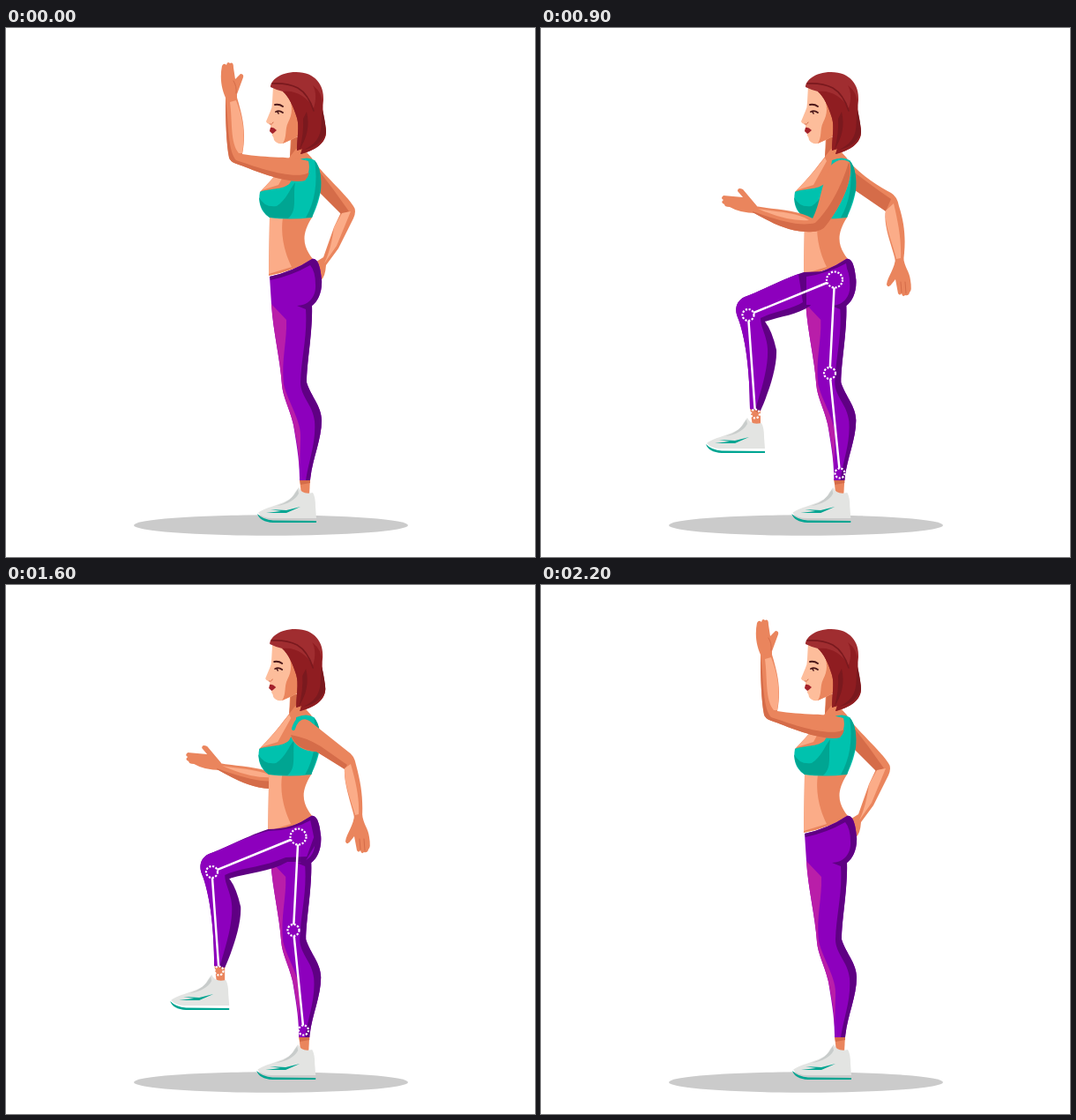
An HTML page that plays this animation: 600x600 px, repeating every 2.4 s.

```html
<!DOCTYPE html>
<html lang="en">
<head>
<meta charset="utf-8">
<title>High knees</title>
<style>
html, body { margin: 0; width: 100%; height: 100%; overflow: hidden; background: #fff; }
svg { display: block; width: 100vw; height: 100vh; }
</style>
</head>
<body>
<svg id="stage" viewBox="0 0 600 600"></svg>
<script>
const skin = '#ea855d', shade = '#d56c49', light = '#fbac88';
const teal = '#00c2ae', tealDark = '#00a592';
const purple = '#8d00bd', purpleDark = '#5f0083', magenta = '#b91ea9';
const hairRed = '#a02d30', hairDeep = '#8f1d21', hairDark = '#7a191e';

const fill = (c, d) => `<path fill="${c}" d="${d}"/>`;
const line = (c, w, d) => `<path fill="none" stroke="${c}" stroke-width="${w}" stroke-linecap="round" d="${d}"/>`;
const at = (x, y, s, turn = 0) => `<g transform="translate(${x} ${y}) rotate(${turn} 330 96)">${s}</g>`;

const head =
  fill('#fdbd9b', 'M303 66L302 84Q302 90 300 94L295 106Q296 109 300 109L300 113L299 117L302 119L302 122Q304 124 304 127Q307 132 314 131L325 126L335 120L332 80L316 68Z') +
  fill(skin, 'M319 74C326 88 325 98 320 107C316 115 319 123 314 131L325 126L336 120V90Z') +
  line('#4a1719', 2, 'M305 87Q310 86 314 89') +
  line('#4a1719', 1.8, 'M306 95Q310 93 314 96') +
  line('#4a1719', 1.6, 'M308 95L309 97') +
  line(shade, 1, 'M299 109Q302 110 303 107') +
  fill('#a3212b', 'M300 113Q303 112 307 116Q304 119 302 120L299 117Z') +
  fill(hairRed, 'M300 67C300 60 310 50 329 50C351 50 361 65 360 82C358 97 362 104 363 116C364 130 351 139 334 143L336 137L330 139C330 125 333 112 330 102C326 89 321 78 314 72Q306 70 300 67Z') +
  fill(hairDeep, 'M314 72C329 70 341 78 349 91C352 81 352 72 348 65Q360 74 359 88C358 100 362 108 363 118C363 131 350 139 334 143L336 137L330 139C330 125 333 112 330 102C326 89 321 78 314 72Z') +
  line(hairDark, 1.6, 'M302 63Q319 62 331 68Q343 75 349 94') +
  fill(hairDark, 'M359 93C356 106 361 119 349 131Q343 136 338 138Q358 134 363 118Q362 104 359 93Z') +
  fill(hairDark, 'M341 95C345 111 341 125 333 138Q338 119 337 103Z');

const shoe =
  fill('#e3e4e2', 'M286 550C292 544 313 541 324 533Q328 526 332 521Q336 530 348 527Q351 532 351 543L352 556H302Q291 556 286 550Z') +
  fill('#c8cccb', 'M331 523Q323 538 307 542Q326 539 332 528Z') +
  fill(tealDark, 'M285 551Q292 558 303 558.5L352 559V561H303Q288 560 285 551Z') +
  fill(tealDark, 'M300 546L318 547L334 543L318 550L295 550L312 548Z');

const stance =
  fill(skin, 'M333 511H345L344 530H335Z') + fill(shade, 'M333 512H345V516L334 518Z') +
  fill(purple, 'M299 282Q326 276 347 262C355 260 357 276 358 285C359 299 354 310 347 315C348 342 341 380 341 402C346 418 358 429 358 445C358 467 347 490 345 513H333C333 488 329 470 326 450C321 430 314 418 313 405C311 375 303 345 301 313Z') +
  fill(magenta, 'M301 313L318 331C319 355 312 376 315 404C320 425 336 447 334 466L333 500C333 482 328 460 326 450C321 430 314 418 313 405C311 375 303 345 301 313Z') +
  fill(purpleDark, 'M299 282Q326 276 347 262C355 260 357 276 358 285C359 300 353 311 347 315C348 345 341 380 341 402C346 418 358 429 358 445C358 467 347 490 345 513H340C343 492 352 470 350 446C348 427 334 418 334 402C335 373 342 350 340 319L330 315C342 315 352 306 351 291Q351 276 345 269Q324 281 300 286Z') +
  shoe;

const ankle = fill(skin, 'M237 430H249V452H240Z') + fill(shade, 'M237 431H249L247 437Z');
const ankleUp = at(-4, -73, ankle);

const kneeLow =
  ankle + at(-98, -79, shoe) +
  fill(purpleDark, 'M298 277C276 284 248 299 231 305C220 310 220 321 223 328C232 350 237 390 237 432L249 434C258 414 268 385 267 365Q262 343 254 333C272 327 291 325 304 316L322 300V276Z') +
  fill(purple, 'M292 279C274 285 248 299 231 305C220 310 220 321 223 328C232 350 237 390 237 432L243 433C250 410 258 385 257 364C256 348 249 340 249 329C265 321 285 319 297 311Q294 292 292 279Z') +
  fill(purple, 'M301 282Q326 278 346 267L350 290L330 314L301 314Z');
const kneeHigh =
  ankleUp + at(-102, -152, shoe) +
  fill(purpleDark, 'M298 250C276 242 250 229 232 227C218 226 216 237 218 246C228 273 234 300 233 358L244 362C255 340 263 310 262 291Q261 278 256 270C275 277 287 291 302 300L330 288L345 266L299 270Z') +
  fill(purple, 'M288 246C270 240 250 229 232 227C218 226 216 237 218 246C228 273 234 300 233 358L239 360C248 335 254 305 252 285C250 276 246 269 246 263C262 264 272 270 284 275L298 268Q290 259 288 246Z') +
  fill(purple, 'M299 268Q322 272 350 262L352 288L302 299Z') +
  fill(purpleDark, 'M299 267Q324 270 350 261V265Q325 273 299 270Z');
const nearKneeLow =
  ankle + at(-98, -79, shoe) +
  fill(purpleDark, 'M349 262Q325 277 298 277C276 284 248 299 231 305C220 310 220 321 223 328C232 350 237 390 237 432L249 434C258 414 268 385 267 365Q262 343 254 333C276 326 299 326 320 314L340 314L352 294Z') +
  fill(purple, 'M346 267Q325 279 298 279C274 285 248 299 231 305C220 310 220 321 223 328C232 350 237 390 237 432L243 433C250 410 258 385 257 364C256 348 249 340 249 329C268 320 290 321 318 309L342 308L350 286Z');
const nearKneeHigh = at(-1.5, 0,
  ankleUp + at(-102, -152, shoe) +
  fill(purpleDark, 'M352 262Q325 266 296 250C272 241 250 229 232 227C218 226 216 237 218 246C228 273 234 300 233 358L244 362C255 340 263 310 262 291Q261 278 256 270C275 277 287 294 306 302L325 314L347 314Z') +
  fill(purple, 'M348 266Q320 268 294 250C270 240 250 229 232 227C218 226 216 237 218 246C228 273 234 300 233 358L239 360C248 335 254 305 252 285C250 276 246 269 246 263C268 264 285 283 306 294L330 305L347 304L353 286Z'));

const torso =
  fill(skin, 'M323 122L322 146C315 155 304 170 288 186L299 215L298 281Q329 275 348 262C336 247 335 234 347 215L357 172Q354 153 341 141L338 125Z') +
  fill(shade, 'M324 126L322 146L329 137L338 139L336 122Z') +
  fill(light, 'M322 147C315 156 304 170 290 184L309 178L324 151Z') +
  fill(light, 'M299 215H314C311 235 316 255 324 271L298 279Z');
const bra =
  fill(teal, 'M288 186C296 182 315 184 322 176Q329 164 330 150Q342 145 350 150C357 159 358 172 357 184C355 197 351 206 347 215Q320 218 299 215C288 208 286 197 288 186Z') +
  fill(tealDark, 'M287 192Q293 204 307 202C318 195 321 184 328 175C325 192 331 207 320 216L299 215Q288 207 287 192Z') +
  fill(tealDark, 'M350 150C357 158 358 171 357 184L347 215H340C350 198 354 176 350 150Z');

const leanTorso =
  fill(skin, 'M299 130L304 151C298 166 289 184 277 203L292 225L298 270Q325 272 348 263C335 249 333 238 336 219L344 174Q339 156 325 146L314 130Z') +
  fill(shade, 'M299 132L304 149L309 140L318 141L314 130Z') +
  fill(light, 'M304 151C298 166 289 184 279 200L297 193L308 160Z') +
  fill(light, 'M292 225H304C303 240 308 255 313 270L298 270Z');
const leanBra =
  fill(teal, 'M278 203C288 201 303 198 310 187Q318 170 317 155Q328 149 336 155C344 163 345 182 344 194Q342 211 336 219Q315 225 292 225C280 220 275 212 278 203Z') +
  fill(tealDark, 'M344 181Q331 186 322 194Q311 204 313 223Q327 222 336 219Q344 207 344 181Z') +
  fill(tealDark, 'M278 209Q284 217 300 214L309 224L292 225Q279 219 278 209Z');

const palmUp =
  fill(skin, 'M250 81C245 71 242 58 245 43Q247 39 250 42Q251 37 254 40Q258 38 258 45L260 58L266 52Q270 52 269 56L262 75L262 83Z') +
  line(shade, 1, 'M258 60Q262 66 261 74');
const palmBack =
  fill(skin, 'M399 244C399 256 390 266 389 275Q391 280 395 274L399 269L402 285Q404 288 406 285Q407 290 410 287Q414 288 415 284Q418 282 416 270C415 260 409 255 408 244Z') +
  line(shade, 1, 'M405 272L406 284M410 272L411 285');
const palmFront = fill(skin, 'M245 202L229 183Q223 180 223 185L229 192L207 190Q203 193 207 195Q203 198 208 200Q208 203 214 203Q226 210 244 210Z');

const armUp = palmUp +
  fill(skin, 'M249 78C249 105 250 132 253 147Q254 152 264 155C286 163 318 177 339 173Q346 162 343 151C326 145 295 148 268 143C273 118 268 99 262 79Z') +
  fill(shade, 'M249 80C249 105 250 132 253 147Q254 152 264 155C286 163 318 177 339 173Q343 169 344 164C326 173 285 158 261 150C251 139 253 108 249 80Z') +
  fill(light, 'M254 84C257 105 254 130 264 142L268 142C272 118 268 100 261 82Z');
const farArmUp = at(2, 0, palmUp +
  fill(skin, 'M249 78C249 105 250 132 254 148Q258 154 270 157L318 171L325 145Q295 147 268 142C273 118 268 99 262 79Z') +
  fill(shade, 'M249 80C249 105 250 132 254 148Q258 154 270 157L318 171L320 163L266 149C254 139 255 110 249 80Z') +
  fill(light, 'M254 84C257 105 256 130 265 141L268 141C272 118 268 100 261 82Z'));
const armBehind =
  fill(skin, 'M346 148C364 170 386 189 394 202Q398 207 394 216L377 250L363 269Q362 283 357 286L352 265L360 260L372 226L380 209L352 180Z') +
  fill(shade, 'M352 158Q371 182 389 208L380 211L353 184Z') +
  fill(light, 'M381 210L391 208L375 247L361 267Q369 250 372 226Z');

const armForward = palmFront +
  fill(skin, 'M243 202C264 206 292 206 308 216C316 202 318 177 328 157Q338 145 350 152C356 170 339 204 324 223Q318 233 300 231C276 230 257 218 240 209Z') +
  fill(shade, 'M240 208C266 217 292 226 311 221C326 207 341 180 349 152C356 170 339 204 324 223Q318 233 300 231C276 230 257 218 240 209Z') +
  fill(light, 'M246 205C268 209 291 209 304 218Q280 220 246 205Z');
const armBackFar = at(3, 16, palmBack) +
  fill(skin, 'M348 150C365 169 384 180 397 187Q404 191 406 202C413 224 414 242 411 264H402C397 243 388 224 391 207L355 182Z') +
  fill(shade, 'M353 162Q378 181 397 194L391 208L356 184Z') +
  fill(light, 'M391 207L400 199C405 220 409 240 408 261L403 262C399 244 389 224 391 207Z');

const armLean =
  fill(skin, 'M239 139C231 128 227 114 228 101Q231 99 232 102Q231 96 235 98Q239 95 241 102L246 117L250 108Q255 108 253 113L249 133Q249 140 247 142Z') +
  fill(skin, 'M238 137C236 165 240 190 249 207Q253 213 263 211L311 192C329 185 331 164 324 156Q316 151 302 164L263 193C262 171 254 151 249 136Z') +
  fill(shade, 'M238 140C236 165 240 190 249 207Q253 213 263 211L311 192C325 187 329 175 328 164C318 185 284 197 258 206C242 187 242 160 238 140Z') +
  fill(light, 'M241 142C245 165 248 181 259 195L263 192C262 171 254 151 247 139Z');
const armLeanFar = at(-6, 57, palmUp) +
  fill(skin, 'M242 137C237 164 238 189 243 204Q246 213 258 211L290 199L303 169L258 192C262 171 258 154 255 137Z') +
  fill(shade, 'M241 142C237 164 238 189 243 204Q246 213 258 211L287 201L278 197L254 204C242 190 243 162 241 142Z') +
  fill(light, 'M246 141C247 165 249 180 253 194L258 191C261 170 258 153 254 139Z');
const leanBackFar = palmBack +
  fill(skin, 'M334 156C350 162 371 167 386 172Q395 176 398 187C408 209 410 224 408 247H399C396 229 384 210 387 190L342 183Z') +
  fill(shade, 'M341 175Q368 179 390 183L386 190L344 184Z') +
  fill(light, 'M386 188L392 184C401 209 406 228 405 244L400 245C396 229 384 210 386 188Z');
const leanBackNear = at(0, 9, palmBack) +
  fill(skin, 'M309 174C310 159 322 154 335 159L383 178Q391 182 394 193C400 215 406 236 408 257L399 260C389 240 382 222 382 202L344 189Q318 187 309 174Z') +
  fill(shade, 'M310 177Q325 177 345 182L384 196L382 202L344 189Q318 187 310 177Z') +
  fill(light, 'M382 201L386 192C392 219 399 237 401 256L399 258C389 240 382 222 382 201Z') +
  line(teal, 5, 'M309 177Q308 156 328 155');

const strap = line(teal, 4, 'M326 163Q330 149 341 150');
const armHip =
  fill(skin, 'M366 275L354 286Q343 296 346 299Q350 301 356 294L352 311Q354 317 358 313Q360 318 363 315Q368 318 369 309L374 277Z') +
  fill(skin, 'M322 169C321 154 332 148 344 154C360 171 382 191 389 202Q392 207 390 216C387 238 380 260 374 279L366 278C365 254 366 230 374 212L352 192Q328 188 322 169Z') +
  fill(shade, 'M323 170Q341 176 357 190L378 207L374 213L352 192Q329 187 323 170Z') +
  fill(light, 'M374 212L383 207Q381 240 369 274L366 272C365 251 367 230 374 212Z') + strap;
const armBackNear = at(-4, 16, palmBack) +
  fill(skin, 'M322 169C321 154 332 148 344 154L388 189Q395 193 397 204C403 226 405 242 404 263H395C390 243 383 224 384 208L352 189Q328 188 322 169Z') +
  fill(shade, 'M323 170Q341 173 357 183L387 204L384 209L352 189Q329 187 323 170Z') +
  fill(light, 'M384 208L391 203C397 224 401 242 400 260L396 261C391 243 383 224 384 208Z') + strap;

// Dotted joints joined by bones that stop just short of each ring.
function skeleton(hip, knee, ankle, knee2, ankle2) {
  const ring = ([x, y, r]) => `<circle cx="${x}" cy="${y}" r="${r}" fill="none" stroke="#fff" stroke-width="2.2" stroke-dasharray="2.2 1.6"/>`;
  const bone = (a, b) => {
    const dx = b[0] - a[0], dy = b[1] - a[1], n = Math.hypot(dx, dy);
    const p = (a[2] + 1) / n, q = 1 - (b[2] + 1) / n;
    return line('#fff', 2.5, `M${a[0] + dx * p} ${a[1] + dy * p}L${a[0] + dx * q} ${a[1] + dy * q}`);
  };
  return [hip, knee, ankle, knee2, ankle2].map(ring).join('') +
    bone(hip, knee) + bone(knee, ankle) + bone(hip, knee2) + bone(knee2, ankle2);
}
const lowBones = skeleton([333, 285.5, 9], [235, 325.5, 6.5], [243, 437.5, 5], [327.5, 391.5, 6.5], [339, 505, 5.5]);

const poses = {
  standA: armBehind + torso + stance + bra + head + armUp,
  lowA: armBackFar + torso + at(-.7, 0, stance) + kneeLow + bra + head + armForward + lowBones,
  highA: leanBackFar + leanTorso + at(.7, 0, stance) + kneeHigh + leanBra + at(-27, 6.5, head, -6) + armLean +
    skeleton([331.5, 287.5, 9], [233, 249, 6.5], [239, 362, 5], [328.5, 395, 6.5], [339, 508, 5.5]),
  standB: at(-.8, 0, farArmUp + torso + stance + bra + head) + armHip,
  lowB: at(-.8, 0, armForward + torso + stance + nearKneeLow + bra + head) + armBackNear + at(-1.5, 0, lowBones),
  highB: armLeanFar + at(-2, 0, leanTorso) + at(-.5, 0, stance) + nearKneeHigh + at(-2, 0, leanBra) + at(-28, 6.5, head, -6) + leanBackNear +
    skeleton([330, 287.5, 9], [232, 249, 6.5], [238, 363, 5], [326.5, 397.5, 6.5], [338, 509, 5.5])
};
const timeline = [
  [500, 'standA'], [700, 'lowA'], [900, 'highA'], [1100, 'lowA'],
  [1600, 'standB'], [1800, 'lowB'], [2000, 'highB'], [2200, 'lowB'], [2400, 'standA']
];

const stage = document.getElementById('stage');
stage.innerHTML = '<ellipse cx="300.5" cy="564" rx="155.5" ry="11.7" fill="#cbcbcb"/>' +
  Object.entries(poses).map(([name, s]) => `<g id="${name}" visibility="hidden">${s}</g>`).join('');

let shown;
function draw() {
  const t = performance.now() % 2400;
  const name = timeline.find(step => t < step[0])[1];
  if (name !== shown) {
    if (shown) document.getElementById(shown).setAttribute('visibility', 'hidden');
    document.getElementById(name).setAttribute('visibility', 'visible');
    shown = name;
  }
  requestAnimationFrame(draw);
}
draw();
</script>
</body>
</html>
```
